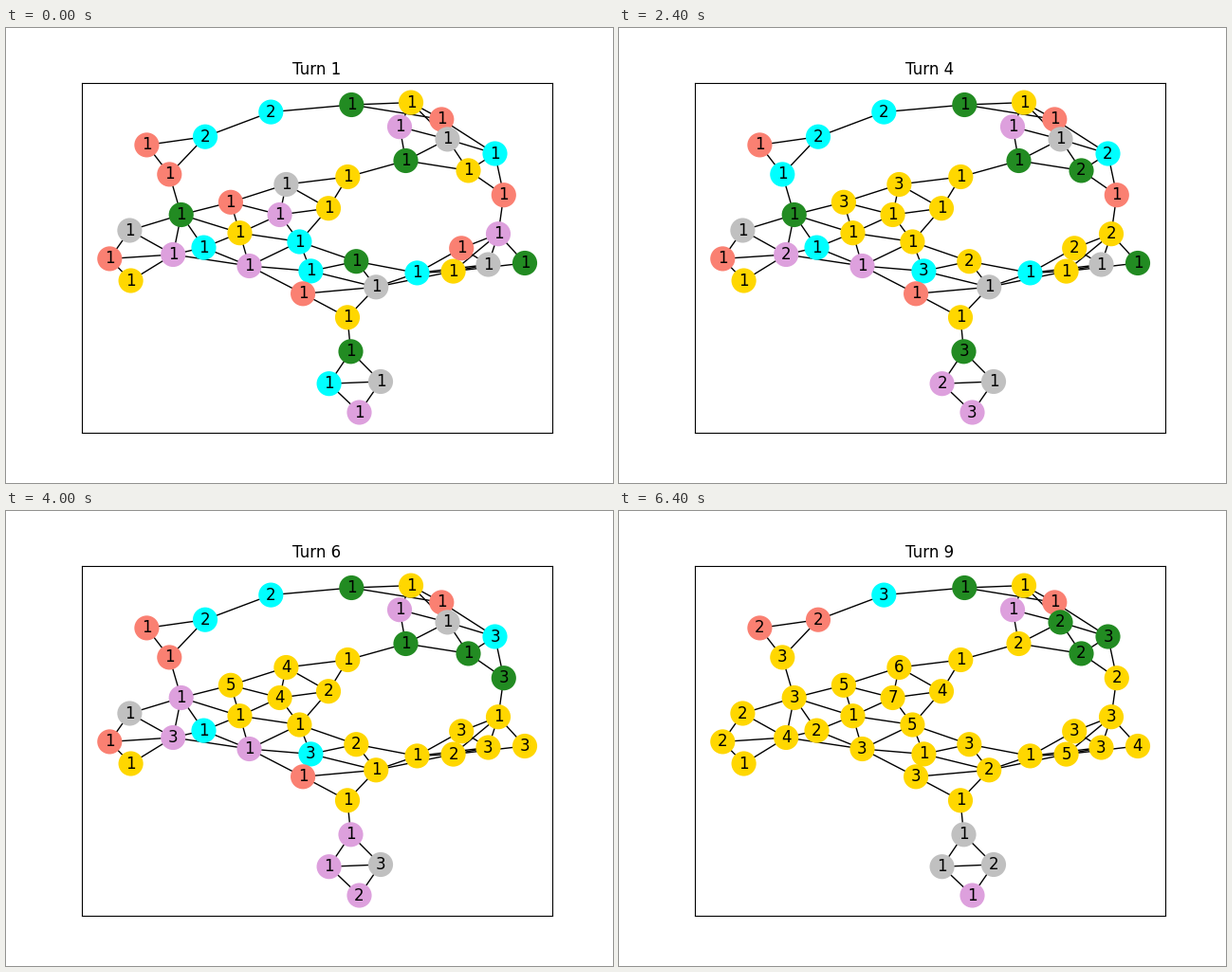
These frames come from a looping animation (640x480 px, 8 s). A matplotlib script:

```python
import matplotlib.pyplot as plt
from matplotlib.animation import FuncAnimation
from matplotlib.collections import LineCollection

WIDTH, HEIGHT, DPI = 640, 480, 100
TURN_MS = 800
TURNS = 9
TICKS = 10  # the final turn is held for two ticks

COLORS = {"S": "salmon", "C": "cyan", "G": "forestgreen",
          "Y": "gold", "P": "plum", "E": "silver"}

# Territory centres in stage pixels, y downwards.
POSITIONS = [
    (148.4, 123.4), (210, 114.7), (279.3, 88.6), (364.3, 81), (427, 78.6),
    (459.3, 96.4), (415, 104.2), (465.5, 117.4), (515.5, 132.5), (421.5, 140),
    (487.5, 150.4), (524.8, 176.2), (172.3, 154.4), (184.7, 197), (236.9, 183.8),
    (295.4, 165), (360.3, 157), (340, 190.2), (288.6, 197), (246.5, 216.2),
    (309.4, 225.5), (208.5, 231.6), (176.2, 239), (130.4, 213.5), (109.3, 243.4),
    (131.6, 266.5), (256.5, 251), (321.4, 256.4), (369.3, 246.2), (390.2, 273.3),
    (313.1, 280.3), (360, 305.3), (363.5, 341.3), (340.6, 375.2), (395, 373),
    (372.5, 405.5), (433.5, 258.4), (471.6, 256.6), (480.2, 232.3), (508.5, 249.5),
    (519, 217.2), (547, 248),
]
OWNERS = "SCCGYSPECGYSSGSEYYPYCCPESYPCGESYGCEPCYSEPG"

LINKS = {
    0: (1, 12), 1: (2, 12), 2: (3,), 3: (4, 5), 4: (5, 6, 7), 5: (7, 8),
    6: (7, 9), 7: (8, 9, 10), 8: (10, 11), 9: (10, 16), 10: (11,), 11: (40,),
    12: (13,), 13: (14, 19, 21, 22, 23), 14: (15, 18, 19), 15: (16, 17, 18),
    16: (17,), 17: (18, 20), 18: (19, 20), 19: (20, 21, 26), 20: (26, 27, 28),
    21: (22, 26), 22: (23, 24, 25, 26), 23: (24,), 24: (25,), 26: (27, 30),
    27: (28, 29, 30), 28: (29, 36), 29: (30, 31, 36, 37), 30: (31,), 31: (32,),
    32: (33, 34), 33: (34, 35), 34: (35,), 36: (37, 38, 39), 37: (39, 40, 41),
    38: (39, 40), 39: (40,), 40: (41,),
}

# Moves per turn: territory, owner, armies.
MOVES = {
    1: "1C2 2C2",
    2: "12C2 15Y2 20Y2 27C2 32G2 33P1 34E2",
    3: "15Y3 18Y1 20Y1 27C3 28Y2 32G3 33P2 34E1 35P2",
    4: "8C2 10G2 12C1 14Y3 22P2 35P3 38Y2 40Y2",
    5: "0S2 8C3 10G3 14Y4 15Y4 16Y2 22P3 32P1 33P1 35P2 36Y1 38Y3 39Y3",
    6: "0S1 10G1 11G3 12S1 13P1 14Y5 16Y1 17Y2 18Y4 29Y1 34E3 37Y2 40Y1 41Y3",
    7: "2C3 8G3 11G1 12C2 15Y5 17Y3 18Y5 20Y4 21P1 23E3 26Y3 27Y1 30Y3 "
       "32E1 34E2 35P1 40G2",
    8: "0S2 13Y2 17Y4 18Y6 20Y5 21Y2 23E2 33E1 37Y4 40Y2",
    9: "1S2 7G2 9Y2 10G2 11Y2 12Y3 13Y3 15Y6 18Y7 22Y4 23Y2 24Y2 28Y3 29Y2 "
       "37Y5 40Y3 41Y4",
}


def board(turn):
    """Owners and army counts after the given turn."""
    owners, armies = list(OWNERS), ["1"] * len(OWNERS)
    for t in range(1, turn + 1):
        for move in MOVES[t].split():
            node = int(move[:-2])
            owners[node], armies[node] = move[-2:]
    return owners, armies


fig = plt.figure(figsize=(WIDTH / DPI, HEIGHT / DPI), dpi=DPI, facecolor="white")
ax = fig.add_axes([0.125, 0.11, 0.775, 0.77])
ax.set_xticks([])
ax.set_yticks([])

segments = [(POSITIONS[a], POSITIONS[b]) for a, ends in LINKS.items() for b in ends]
ax.add_collection(LineCollection(segments, colors="black", linewidths=1, zorder=1))
dots = ax.scatter(*zip(*POSITIONS), s=300, linewidths=1.5, zorder=2)
labels = [ax.text(x, y, "1", size=12, family="DejaVu Sans", ha="center",
                  va="center", zorder=3) for x, y in POSITIONS]
title = ax.set_title("Turn 1", size=12, family="DejaVu Sans")
ax.set_xlim(0.125 * WIDTH, 0.9 * WIDTH)
ax.set_ylim(0.89 * HEIGHT, 0.12 * HEIGHT)


def update(tick):
    turn = min(tick + 1, TURNS)
    owners, armies = board(turn)
    dots.set_color([COLORS[o] for o in owners])
    for label, count in zip(labels, armies):
        label.set_text(count)
    title.set_text(f"Turn {turn}")
    return [dots, title, *labels]


anim = FuncAnimation(fig, update, frames=TICKS, interval=TURN_MS,
                     repeat=True, repeat_delay=0, blit=False)
plt.show()
```
